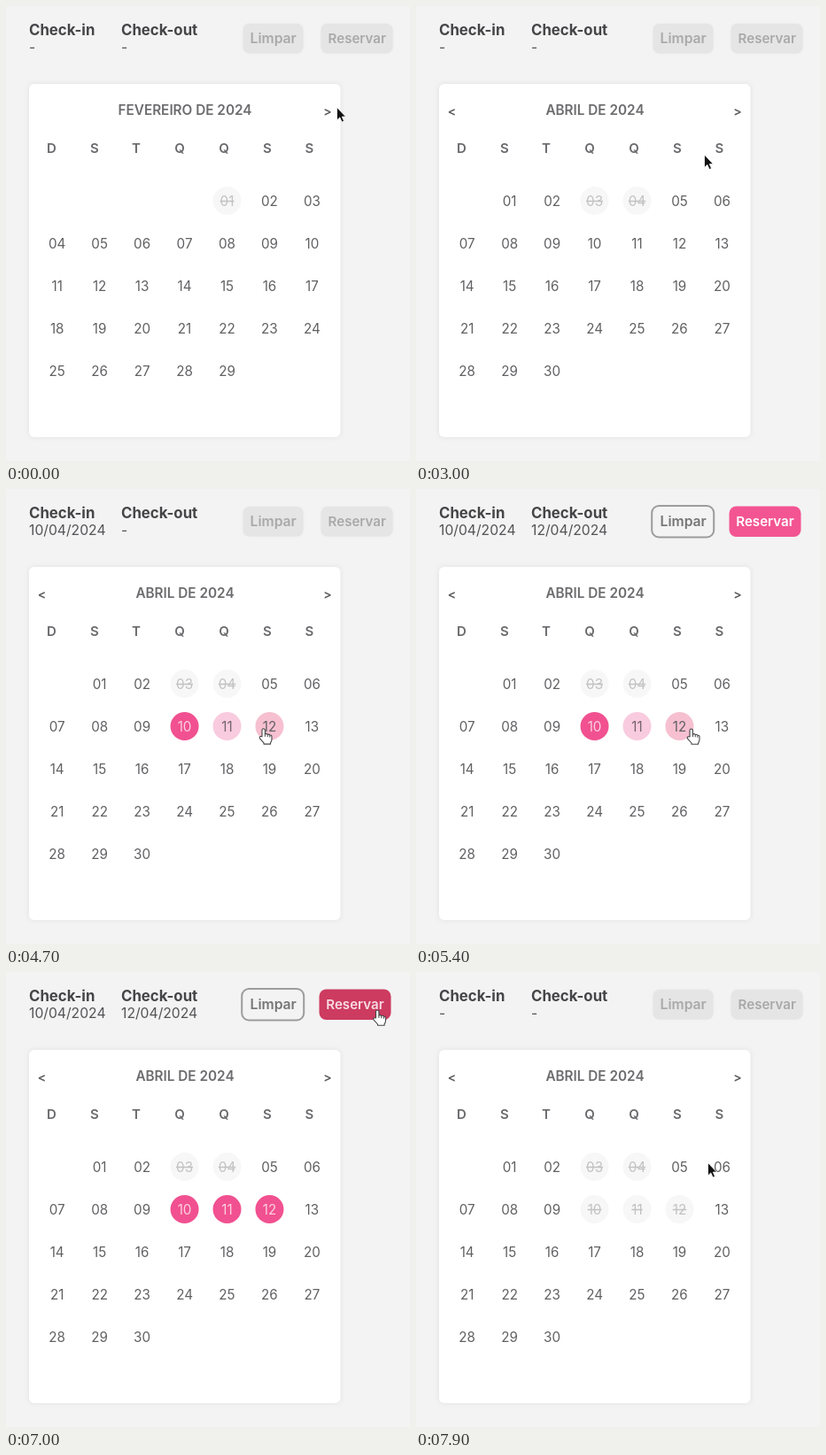
Write an HTML page that moves like this. It is 456 by 514 pixels and loops after 8 s.

```html
<!DOCTYPE html>
<html lang="pt-BR">
<head>
<meta charset="utf-8">
<title>Reserva</title>
<style>
  html, body { margin: 0; width: 100%; height: 100%; overflow: hidden; background: #f3f3f3; }
  svg { display: block; width: 456px; height: 514px; font-family: Inter, "Open Sans", sans-serif; }
  .card { filter: drop-shadow(0 0 3px #00000012); }
  .off { filter: drop-shadow(0 0 1px #0000000c); }
</style>
</head>
<body>
<svg id="stage" viewBox="0 0 456 514"></svg>
<script>
const LOOP = 8000, STEP = 100;
const MARCH_AT = 400, APRIL_AT = 2200, IN_AT = 4100, OUT_AT = 5100, BOOKED_AT = 7300;
const stage = document.getElementById('stage');
const names = ['JANEIRO', 'FEVEREIRO', 'MARÇO', 'ABRIL'];
const taken = { 1: [1], 2: [2, 15], 3: [3, 4] };

// Pointer path: time, x, y
const path = [
  [0, 373.5, 114.5], [100, 373.5, 114.5], [400, 364, 115], [2700, 364, 115],
  [3000, 325.5, 168], [3600, 210, 269], [3700, 210, 270], [4200, 210, 270],
  [4900, 311, 271], [5500, 311, 271], [6600, 419.5, 43], [7700, 419.5, 43], [7900, 329.5, 215.5]
];
const ARROW = 'M0 0V14.5L3.3 11.4 5.6 16.6 8 15.5 5.8 10.6H10Z';
const HAND = 'M-2 9V1.7a1.7 1.7 0 0 1 3.4 0V6q1.5-1.1 2.8.5q1.7-.7 2.6.8q2-.4 2.2 1.5V12q0 2-1.4 3.8V17.3H0V16L-4.6 10.8q-.6-2.3 1.1-2.1Z';

function pointer(t) {
  const i = path.findIndex(p => p[0] > t);
  if (i < 0) return path[path.length - 1].slice(1);
  const [t0, x0, y0] = path[i - 1], [t1, x1, y1] = path[i];
  let k = (t - t0) / (t1 - t0);
  k = k * k * (3 - 2 * k);
  return [x0 + (x1 - x0) * k, y0 + (y1 - y0) * k];
}

const text = (s, x, y, size, fill, weight = 400, anchor = 'middle', extra = '') =>
  `<text x="${x}" y="${y}" font-size="${size}" fill="${fill}" font-weight="${weight}" text-anchor="${anchor}" ${extra}>${s}</text>`;
const circle = (x, y, r, fill) => `<circle cx="${x}" cy="${y}" r="${r}" fill="${fill}"/>`;
const rect = (x, y, w, h, r, fill, extra = '') =>
  `<rect x="${x}" y="${y}" width="${w}" height="${h}" rx="${r}" fill="${fill}" ${extra}/>`;

function monthDays(month) {
  const first = new Date(2024, month, 1).getDay();
  const count = new Date(2024, month + 1, 0).getDate();
  return Array.from({ length: count }, (_, i) => ({
    day: i + 1,
    x: 57.7 + (first + i) % 7 * 47.95,
    y: 220 + Math.floor((first + i) / 7) * 48
  }));
}

function buttons(active, hover) {
  if (!active) {
    return rect(267.5, 20, 68, 33.5, 7, '#e5e5e5', 'class="off"') + text('Limpar', 301.7, 42, 15.7, '#a9a9a9', 600) +
      rect(355.5, 20, 81, 33.5, 7, '#e5e5e5', 'class="off"') + text('Reservar', 396.3, 42, 15.1, '#a9a9a9', 600);
  }
  return rect(266.2, 19, 70, 35.5, 8, '#f3f3f3', 'stroke="#9c9c9c" stroke-width="2"') +
    text('Limpar', 301.7, 42, 15.7, '#757575', 600) +
    rect(353.5, 19.5, 81, 34.5, 8, hover ? '#cd3b60' : '#f25592') +
    text('Reservar', 394, 42, 15.1, hover ? '#f8dce4' : '#fff', 600);
}

function draw(t) {
  const month = t < MARCH_AT ? 1 : t < APRIL_AT ? 2 : 3;
  const booked = t >= BOOKED_AT;
  const hasIn = t >= IN_AT && !booked, hasOut = t >= OUT_AT && !booked;
  const [px, py] = pointer(t);
  const blocked = booked ? [...taken[3], 10, 11, 12] : taken[month];
  const days = monthDays(month);
  const over = days.find(d => !blocked.includes(d.day) && Math.hypot(px - d.x, py - d.y) < 16);
  const hover = over ? over.day : 0;
  const onNext = Math.hypot(px - 363, py - 118) < 10;
  const onBook = hasOut && px > 353 && px < 435 && py > 19 && py < 54;
  const settled = hasOut && hover !== 12;

  let out = text('Check-in', 26, 33, 16.8, '#454548', 700, 'start') +
    text('Check-out', 130, 33, 16.8, '#454548', 700, 'start') +
    text(hasIn ? '10/04/2024' : '-', 26, 52, 15.7, '#545457', 400, 'start') +
    text(hasOut ? '12/04/2024' : '-', 130, 52, 15.7, '#545457', 400, 'start') +
    buttons(hasOut, onBook) +
    rect(26, 88, 351.5, 399, 6, '#fff', 'class="card"') +
    text(names[month] + ' DE 2024', 202, 123, 15.3, '#6c6c6f', 600);

  if (month > 1) out += text('&lt;', 40.5, 123.5, 14, '#5a5a5a', 600);
  if (onNext) out += circle(363, 118, 9, '#e9e9e9');
  out += text('&gt;', 363, 123.5, 14, '#5a5a5a', 600);
  [51.3, 99.8, 147, 196, 246, 295, 342.3].forEach((x, i) => {
    out += text('DSTQQSS'[i], x, 165.5, 15, '#6a6a6d', 600);
  });

  for (const { day, x, y } of days) {
    const off = blocked.includes(day);
    const solid = hasIn && day !== hover && (day === 10 || settled && day > 10 && day < 13);
    const ranged = hasIn && !settled && day > 10 && day < hover;
    const fill = off ? '#f7f7f7' : solid ? '#f15190' : day === hover ? '#f6c0d1' : ranged ? '#f9cbde' : '';
    if (fill) out += circle(x, y, 16, fill);
    const ink = off ? '#c2c2c2' : solid ? '#fcd0e0' : ranged ? '#75666d' : '#606063';
    out += text(String(day).padStart(2, '0'), x, y + 5.5, 15.2, ink, 400, 'middle',
      off ? 'text-decoration="line-through"' : '');
  }

  const hand = hover || onNext || onBook;
  out += `<g transform="translate(${px} ${py})" stroke-linejoin="round">` + (hand
    ? `<path d="${HAND}" fill="#fff" stroke="#444" stroke-width="1.1"/><path d="M1.4 6V9M4.2 7V9.3M6.8 7.6V9.8" stroke="#444"/>`
    : `<path d="${ARROW}" fill="#111" stroke="#fff" stroke-width=".8"/>`) + '</g>';
  stage.innerHTML = out;
}

let last = -1;
function tick(now) {
  const t = Math.floor(now % LOOP / STEP) * STEP;
  if (t !== last) draw(last = t);
  requestAnimationFrame(tick);
}
draw(0);
requestAnimationFrame(tick);
</script>
</body>
</html>
```
